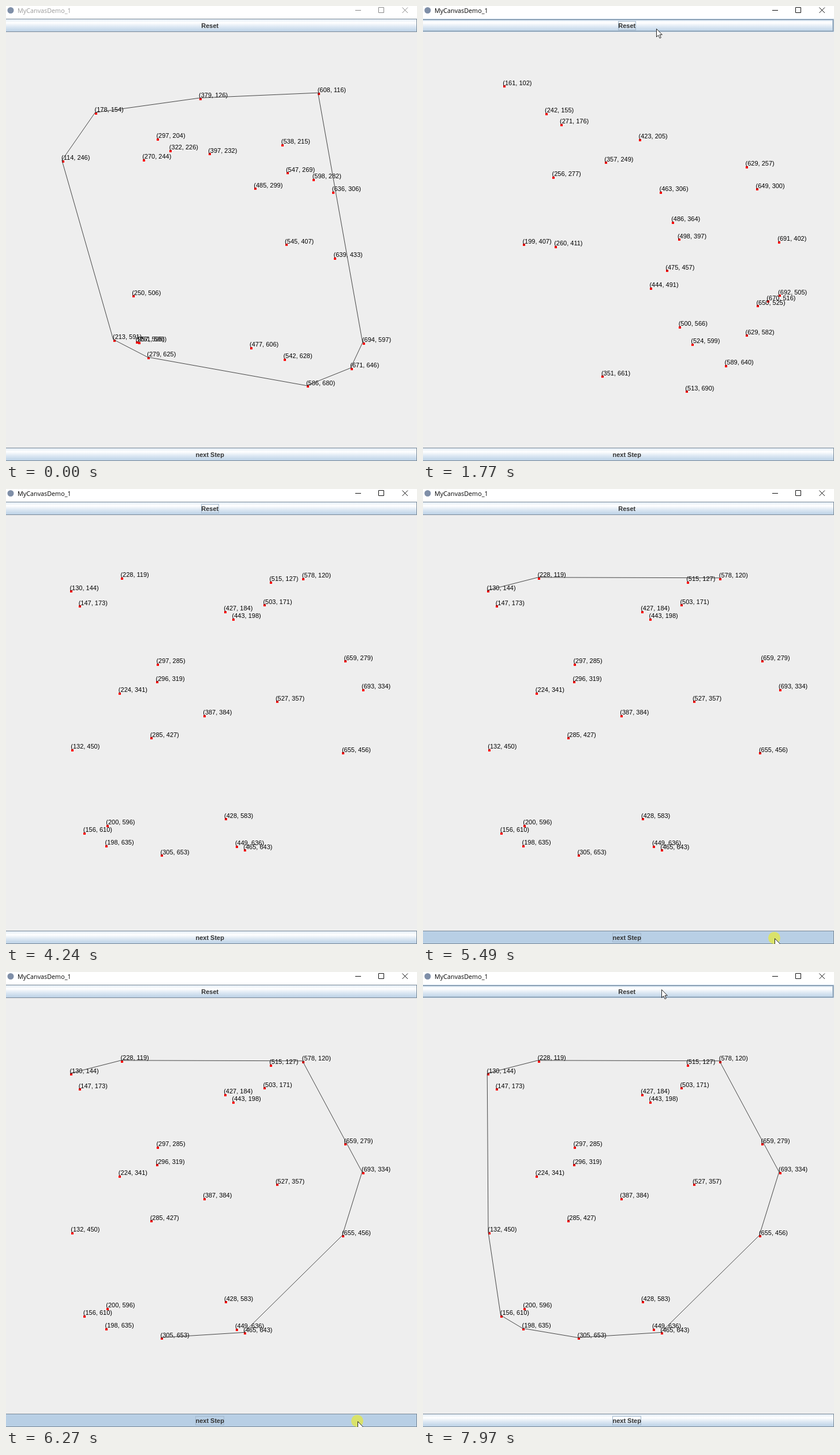
An HTML page with a canvas that plays this animation: 712 by 787 pixels, repeating every 8000 ms.

```html
<!DOCTYPE html>
<html lang="en">
<head>
<meta charset="utf-8">
<title>Convex hull</title>
<style>
html, body { margin: 0; width: 100%; height: 100%; overflow: hidden; background: #eee; }
canvas { display: block; }
</style>
</head>
<body>
<canvas id="stage" width="712" height="787"></canvas>
<script>
const ctx = document.getElementById('stage').getContext('2d');
const LOOP = 8000;
const SANS = '"Liberation Sans", Arial, sans-serif';

const parse = s => s.split(' ').map(p => p.split(',').map(Number));

function scatter(seed) {
  const rnd = () => (seed = seed * 16807 % 2147483647) / 2147483647;
  return Array.from({ length: 25 }, () =>
    [Math.round(110 + rnd() * 585), Math.round(105 + rnd() * 562)]);
}

const first = parse('178,154 379,126 608,116 114,246 297,204 322,226 270,244 397,232 538,215 ' +
  '547,269 598,282 485,299 636,306 545,407 639,433 250,506 213,591 257,595 261,596 279,625 ' +
  '477,606 542,628 586,680 671,646 694,597');
const second = parse('161,102 242,155 271,176 423,205 357,249 256,277 629,257 463,306 649,300 ' +
  '486,364 498,397 199,407 260,411 691,402 475,457 444,491 692,505 670,516 650,525 500,566 ' +
  '629,582 524,599 589,640 351,661 513,690');
const third = scatter(4711);
const last = parse('228,119 130,144 147,173 515,127 578,120 427,184 443,198 503,171 297,285 ' +
  '296,319 224,341 659,279 693,334 527,357 387,384 285,427 132,450 655,456 200,596 156,610 ' +
  '198,635 305,653 428,583 449,636 465,643');

const sets = [[0, first], [1770, second], [2700, third], [3010, last]];
const edgeTimes = [4930, 5320, 5560, 5730, 5960, 6190, 6340, 6570, 6880, 7190];
const presses = [[1690, 1770], [2620, 2700], [2930, 3010], [5250, 5320], [5490, 5560],
  [5880, 5960], [6110, 6190], [6270, 6340], [6800, 6880], [7110, 7190]];

// Cursor moves: first step, last step, step count, control point, end point
const origin = [533, 607];
const moves = [
  [680, 1220, 8, [80, 190], [395, 57]],
  [1390, 1540, 3, [400, 48], [404, 39]],
  [3470, 4240, 11, [490, 420], [606, 794]],
  [4320, 4390, 2, [608, 788], [609, 782]],
  [4620, 4780, 3, [609, 780], [609, 778]],
  [4930, 4930, 1, [609, 777], [609, 777]],
  [7270, 7890, 9, [500, 330], [410, 32]],
  [7970, 7970, 1, [413, 30], [413, 30]]
];

// Gift wrapping, clockwise from the leftmost point
function hull(pts) {
  const start = pts.reduce((a, b) => b[0] < a[0] ? b : a);
  const path = [start];
  let cur = start;
  do {
    let next = pts[0] === cur ? pts[1] : pts[0];
    for (const p of pts) {
      const cross = (next[0] - cur[0]) * (p[1] - cur[1]) - (next[1] - cur[1]) * (p[0] - cur[0]);
      if (cross < 0) next = p;
    }
    path.push(cur = next);
  } while (cur !== start && path.length <= pts.length);
  return path;
}

const firstHull = hull(first);
const lastHull = hull(last);

const toScreen = ([x, y]) => [x * 0.898 - 5.7, y * 0.898 + 45.8];

function cursorAt(t) {
  if (t < moves[0][0]) return null;
  let pos = origin;
  for (const [t0, t1, n, c, end] of moves) {
    if (t < t0) break;
    const step = t >= t1 ? n : Math.floor((t - t0) / (t1 - t0) * (n - 1) + 0.001) + 1;
    const k = step / n, u = k * k * (3 - 2 * k), v = 1 - u;
    pos = pos.map((a, i) => Math.round(v * v * a + 2 * u * v * c[i] + u * u * end[i]));
  }
  return pos;
}

function text(str, x, y, font, color, align = 'left') {
  ctx.font = font;
  ctx.fillStyle = color;
  ctx.textAlign = align;
  ctx.fillText(str, x, y);
}

function frame(x, y, w, h, color) {
  ctx.strokeStyle = color;
  ctx.lineWidth = 1;
  ctx.strokeRect(x + 0.5, y + 0.5, w - 1, h - 1);
}

function titleBar(active) {
  ctx.fillStyle = '#fff';
  ctx.fillRect(0, 0, 712, 22);
  ctx.fillStyle = '#7f8fa8';
  ctx.beginPath();
  ctx.arc(8, 7.5, 5.5, 0, 7);
  ctx.fill();
  const color = active ? '#000' : '#999';
  text('MyCanvasDemo_1', 20, 12, '10.8px "Open Sans", "Noto Sans", sans-serif', color);
  ctx.strokeStyle = active ? '#111' : '#888';
  ctx.lineWidth = 1;
  ctx.beginPath();
  ctx.moveTo(605, 7.5); ctx.lineTo(615, 7.5);
  ctx.rect(645.5, 2.5, 9, 9);
  ctx.moveTo(686.5, 2.5); ctx.lineTo(696, 12);
  ctx.moveTo(696, 2.5); ctx.lineTo(686.5, 12);
  ctx.stroke();
}

function button(label, y, focusX, focusW, { hover, pressed, focus }) {
  const x = -6, w = 718, h = 23;
  if (pressed) {
    ctx.fillStyle = '#b8cfe5';
  } else {
    const g = ctx.createLinearGradient(0, y, 0, y + h);
    g.addColorStop(0, '#dde8f3');
    g.addColorStop(0.3, '#fff');
    g.addColorStop(0.6, '#dde8f3');
    g.addColorStop(1, '#b8cfe5');
    ctx.fillStyle = g;
  }
  ctx.fillRect(x, y, w, h);
  if (hover && !pressed) {
    frame(x, y, w, h, '#b8cfe5');
    frame(x + 2, y + 2, w - 4, h - 4, '#b8cfe5');
    frame(x + 1, y + 1, w - 2, h - 2, '#7a8a99');
  } else {
    frame(x, y, w, h, '#7a8a99');
  }
  if (focus) frame(focusX, y + 4, focusW, 16, '#a3b8cc');
  text(label, 353.2, y + 16, 'bold 11px ' + SANS, '#333', 'center');
}

function drawPoints(pts) {
  for (const p of pts) {
    const [x, y] = toScreen(p);
    ctx.fillStyle = '#f00';
    ctx.fillRect(Math.round(x), Math.round(y), 4, 4);
    text(`(${p[0]}, ${p[1]})`, x - 0.6, y - 0.6, '11px ' + SANS, '#000');
  }
}

function drawPath(path, edges) {
  if (!edges) return;
  ctx.strokeStyle = '#333';
  ctx.lineWidth = 0.9;
  ctx.beginPath();
  path.slice(0, edges + 1).forEach(p => {
    const [x, y] = toScreen(p);
    ctx.lineTo(x + 0.2, y + 0.2);
  });
  ctx.stroke();
}

function drawCursor([x, y], clicking) {
  if (clicking) {
    ctx.fillStyle = '#d9e26a';
    ctx.beginPath();
    ctx.arc(x - 0.5, y - 0.5, 10.5, 0, 7);
    ctx.fill();
  }
  const arrow = parse('0,0 0,14 3.2,11 5.6,16.2 7.8,15.2 5.5,10.2 9.8,10.2');
  ctx.beginPath();
  arrow.forEach(([dx, dy]) => ctx.lineTo(x + 0.5 + dx, y + 0.5 + dy));
  ctx.closePath();
  ctx.fillStyle = '#fff';
  ctx.fill();
  ctx.strokeStyle = '#222';
  ctx.lineWidth = 1;
  ctx.stroke();
}

function draw(t) {
  const cursor = cursorAt(t);
  const clicking = presses.some(([a, b]) => t >= a && t < b);
  const onReset = !!cursor && cursor[1] >= 22 && cursor[1] < 45;
  const onNext = !!cursor && cursor[1] >= 764 && cursor[1] < 787;
  const pts = sets.filter(s => t >= s[0]).pop()[1];

  ctx.fillStyle = '#eee';
  ctx.fillRect(0, 0, 712, 787);
  titleBar(t >= 1690);
  button('Reset', 22, 338, 31,
    { hover: onReset, pressed: onReset && clicking, focus: t >= 1690 && t < 4930 });
  button('next Step', 764, 328, 50,
    { hover: onNext, pressed: onNext && clicking, focus: t >= 4930 });
  drawPoints(pts);
  if (pts === first) drawPath(firstHull, firstHull.length);
  if (pts === last) drawPath(lastHull, edgeTimes.filter(e => t >= e).length);
  if (cursor) drawCursor(cursor, clicking);
}

const began = performance.now();
function tick() {
  draw((performance.now() - began) % LOOP);
  requestAnimationFrame(tick);
}
tick();
</script>
</body>
</html>
```
